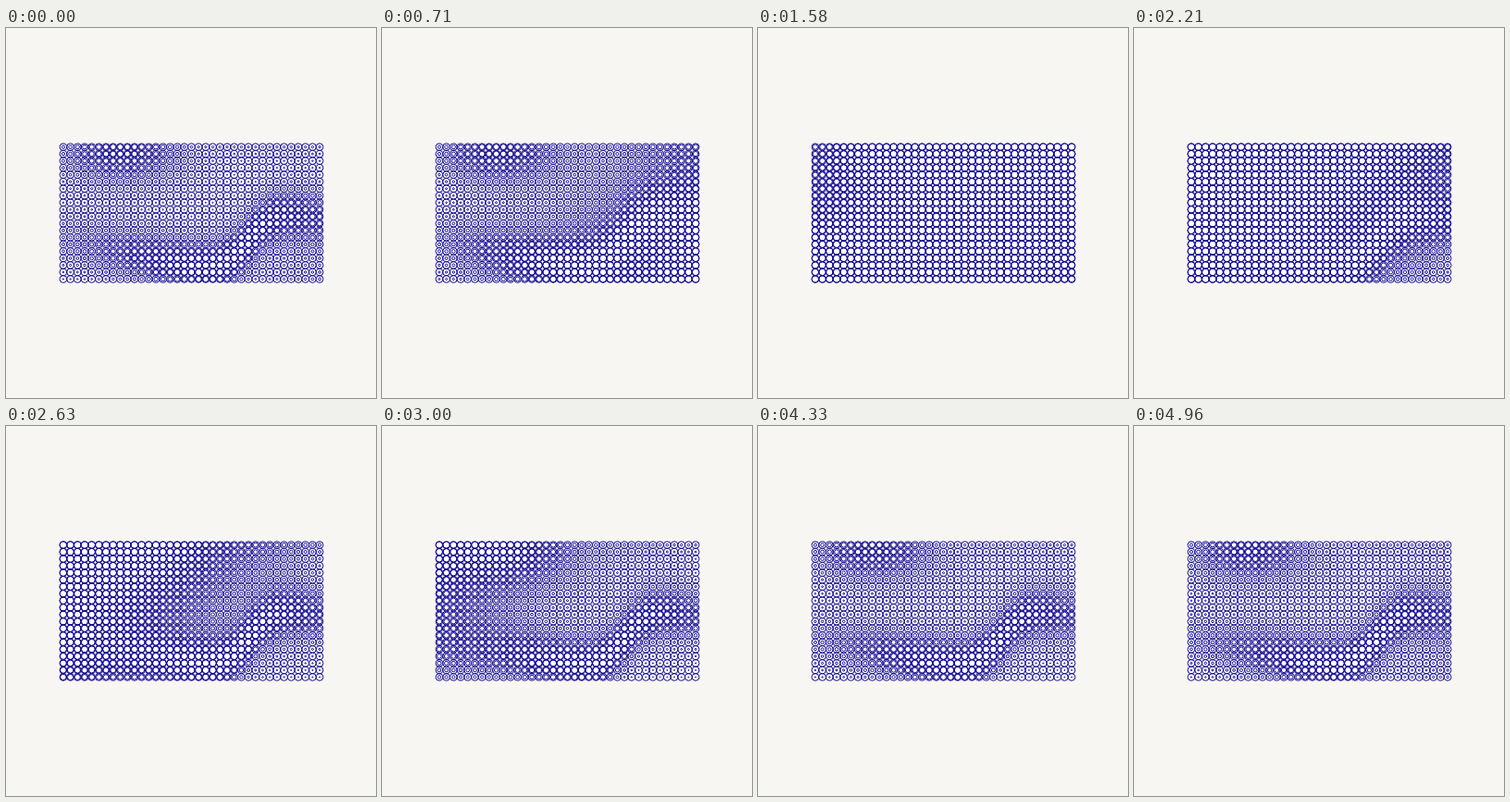
These frames come from a looping animation (400 px wide and 400 px high, 5 s). An HTML page with a canvas:

```html
<!DOCTYPE html>
<html lang="en">
<head>
<meta charset="utf-8">
<title>Ring grid</title>
<style>
html, body { margin: 0; width: 100%; height: 100%; overflow: hidden; background: #f7f6f2; }
canvas { display: block; width: 400px; height: 400px; }
</style>
</head>
<body>
<canvas id="stage" width="400" height="400"></canvas>
<script>
const ctx = document.getElementById('stage').getContext('2d');
const LOOP = 5000, COLS = 37, ROWS = 20;
const LEFT = 61.9, TOP = 128.6, DX = 7.7, DY = 7.52;
const OUTER = 3.85, DOT = 0.3;

const bell = (v, mid, spread) => Math.exp(-(((v - mid) / spread) ** 2));

// Resting size, 0 to 1: a mound at the top left and a ridge that bends up to the right
function rest(x, y) {
  const mound = 0.72 * bell(x, 125, 72) * bell(y, 134, 36);
  const ridgeY = 230 + 0.2 * (x - LEFT) - 40 * (1 + Math.tanh((x - 262) / 28));
  const ridge = 0.9 * bell(x, 232, 165) * bell(y, ridgeY, 30);
  const edge = 0.2 * bell(y, 122, 18);
  return Math.min(0.05 + Math.max(mound, edge) + ridge, 0.95);
}

// Smooth pulse, 0 to 1, peaking when dt is 0
function pulse(dt) {
  const q = 0.5 + 0.5 * Math.cos(2 * Math.PI * dt / LOOP);
  return 1 - (1 - q ** 4) ** 2;
}

const cells = [];
for (let row = 0; row < ROWS; row++) {
  for (let col = 0; col < COLS; col++) {
    const x = LEFT + col * DX, y = TOP + row * DY;
    const peak = 1050 + 960 * (1 - col / (COLS - 1)) + 470 * (1 - row / (ROWS - 1));
    cells.push({ x, y, peak, base: rest(x, y) });
  }
}

function addCircle(x, y, r) {
  ctx.moveTo(x + r, y);
  ctx.arc(x, y, r, 0, 2 * Math.PI);
}

function draw(t) {
  ctx.fillStyle = '#f7f6f2';
  ctx.fillRect(0, 0, 400, 400);

  ctx.beginPath();
  for (const c of cells) addCircle(c.x, c.y, OUTER);
  ctx.fillStyle = '#fff';
  ctx.fill();
  ctx.strokeStyle = '#120a8f';
  ctx.lineWidth = 1;
  ctx.stroke();

  ctx.beginPath();
  for (const c of cells) {
    const size = c.base + (1 - c.base) * pulse(t - c.peak);
    addCircle(c.x, c.y, DOT + (OUTER - DOT) * size);
  }
  ctx.stroke();
}

function frame() {
  draw(performance.now() % LOOP);
  requestAnimationFrame(frame);
}
frame();
</script>
</body>
</html>
```
